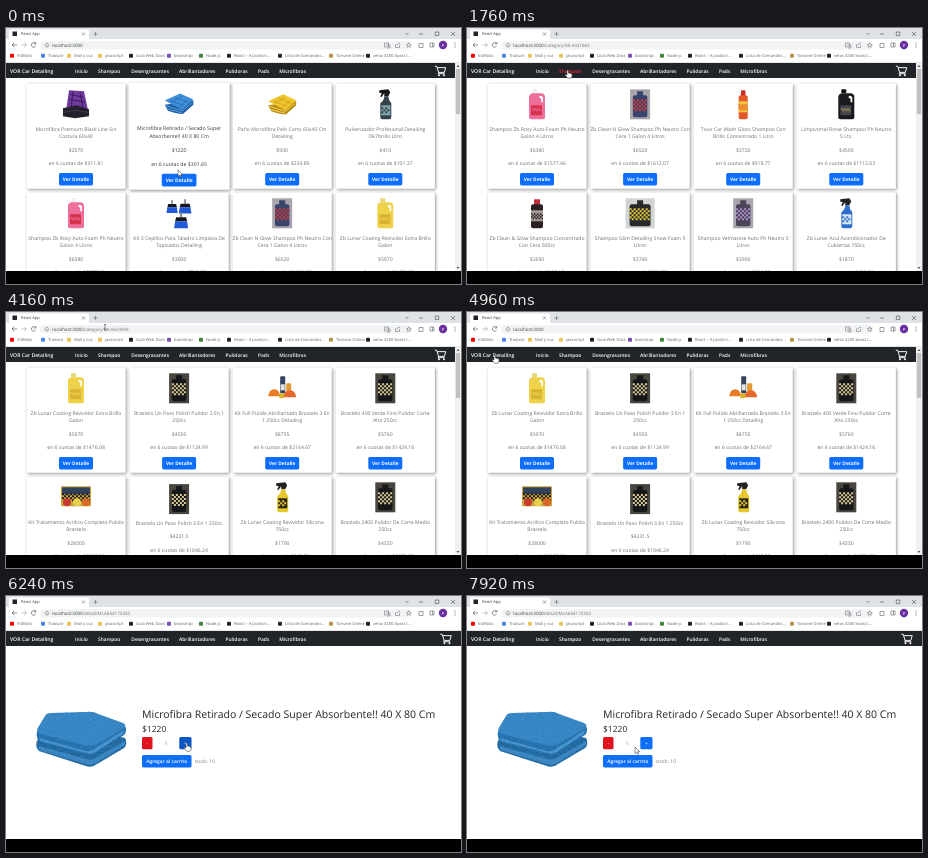
Recreate the animation shown at these times as an HTML page. Size 455 by 256 pixels, loop 8000 ms.

```html
<!DOCTYPE html>
<html lang="es">
<head>
<meta charset="utf-8">
<title>React App</title>
<style>
html, body { margin: 0; width: 100%; height: 100%; overflow: hidden; background: #fff; }
svg { display: block; width: 100vw; height: 100vh; }
text { font-family: "Open Sans", "Noto Sans", sans-serif; text-rendering: geometricPrecision; white-space: pre; }
.card { fill: #fff; filter: drop-shadow(1.1px 1.1px 1.5px rgba(0, 0, 0, .42)); }
#cursor { animation: travel 8s infinite ease-in-out; }
#home-1 { transform-origin: 173px 108px; animation: lift 8s infinite linear; }
@keyframes travel {
  0%, 1% { transform: translate(172px, 142px); }
  8%, 27% { transform: translate(100px, 42px); }
  29%, 40% { transform: translate(153px, 42px); }
  43%, 48% { transform: translate(190px, 42px); }
  52%, 57% { transform: translate(99px, 15px); }
  60%, 63% { transform: translate(27px, 43px); }
  69%, 73% { transform: translate(172px, 142px); }
  75%, 78% { transform: translate(180px, 147px); }
  88%, 89% { transform: translate(119px, 54px); }
  93%, 96% { transform: translate(119px, 30px); }
  99%, 100% { transform: translate(168px, 151px); }
}
@keyframes lift {
  0%, 1% { transform: scale(1.02); fill: #34393e; }
  4%, 67% { transform: scale(1); fill: #6c7176; }
  69%, 100% { transform: scale(1.035); fill: #34393e; }
}
</style>
</head>
<body>
<svg id="stage" viewBox="0 0 455 256" preserveAspectRatio="none"></svg>
<script>
const rect = (x, y, w, h, fill, r = 0, extra = '') =>
  `<rect x="${x}" y="${y}" width="${w}" height="${h}" fill="${fill}" rx="${r}" ${extra}/>`;
const dot = (x, y, r, fill) => `<circle cx="${x}" cy="${y}" r="${r}" fill="${fill}"/>`;
const shape = (d, fill) => `<path d="${d}" fill="${fill}"/>`;
const line = (d, color, w = .7) => `<path d="${d}" fill="none" stroke="${color}" stroke-width="${w}"/>`;
const label = (x, y, size, s, extra = '') => `<text x="${x}" y="${y}" font-size="${size}" ${extra}>${s}</text>`;
const group = (id, body, extra = '') => `<g id="${id}" ${extra}>${body}</g>`;
function checks(x, y, w, h, fill, size = 2) {
  let d = '';
  for (let row = 0; (row + 1) * size <= h; row++)
    for (let col = row % 2; (col + 1) * size <= w; col += 2)
      d += `M${x + col * size} ${y + row * size}h${size}v${size}h${-size}z`;
  return shape(d, fill);
}

// Product pictures, drawn around (0, 0)
const jug = (c, tag, cap, marks = c) =>
  rect(-5, -15, 5, 4, cap, .8) +
  shape('M-8-8Q-7-11-4-11H4Q8-11 8-7V13Q8 15 6 15H-6Q-8 15-8 13Z', c) +
  shape('M3-8.5Q6-8.5 6-6V-2H4.3V-5.5L2-6.8Z', '#fff') + rect(-6, 1, 11, 10, tag, .6) + checks(-5, 4, 9, 4, marks, 1.5);
const spray = (c, trigger, tag, marks = c) =>
  shape('M-6-14L3-15L5-12L3-8H-1V-11L-4-7L-5-8L-3.5-11L-6-11.5Z', trigger) +
  shape('M-1-8H3Q3-4 6-1V13Q6 15 4 15H-3Q-5 15-5 13V-1Q-1-4-1-8Z', c) + rect(-4, 1, 9, 10, tag) + checks(-4, 3, 8, 6, marks);
const bottle = (c, cap, tag, w = 9, marks = c) =>
  rect(-w / 4, -14, w / 2, 6, cap, .6) + rect(-w / 2, -9, w, 24, c, 2) + rect(-w / 2, -3, w, 11, tag) +
  checks(-w / 2, 0, w, 6, marks, 1.5);
const box = (back, body, marks, w = 20) =>
  rect(-w / 2, -15, w, 30, back) + rect(-3, -13, 6, 5, body) + rect(-w * .36, -9, w * .72, 22, body, 2) +
  checks(-w * .36, -5, w * .72, 12, marks);
const towel = (c, dark, lite) =>
  shape('M-14 1L-11 7Q2 11 4 10L14 1V-3Z', dark) + shape('M-14-3L1-10L14-4L3 6Z', c) +
  line('M-13 2L3 7L13-1M-12 5L3 9', lite, .8) + line('M-9-3L5 2M-4-6L9-1M-8-1L3-7M0 3L9-4', dark, .5);
const purpleTowel = shape('M-7-14L8-13L12 6L-10 7Z', '#6f3a9c') +
  line('M-6-10L7-7M-7-5L9-2M-3-13L-5 4M4-12L7 3', '#3c1a61', 1) +
  shape('M-13 4L0 1L13 5V12L-1 14L-13 12Z', '#23202b') + line('M-12 8L0 6L12 8', '#4c4659');
const brush = (x, y, s) => `<g transform="translate(${x} ${y}) scale(${s})">` +
  rect(-1, -9, 2, 5, '#888') + shape('M-5-4H5L6 0H-6Z', '#16181d') + shape('M-6 0H6L7 7H-7Z', '#2159d6') + '</g>';
const brushes = brush(-7, -6, .8) + brush(6, -6, .9) + brush(2, 8, 1);
const pads = rect(-2, -12, 5, 17, '#35435f', 1) + rect(-1.5, -4, 4, 6, '#e3e3de') + rect(4, -5, 5, 11, '#e39a35', 1) +
  shape('M-14 8Q-13 1-8 1Q-3 1-2 8Z', '#ea7c26') + shape('M1 9Q2 2 8 2Q13 2 14 9Z', '#e5672a') + rect(-3, 5, 5, 5, '#d9b52d', 1);
const kit = rect(-15, -11, 30, 20, '#c9a23a', 1) + rect(-14, -10, 28, 7, '#33415c') + checks(-14, -4, 28, 8, '#1d1d1f') +
  dot(-9, 5, 4, '#c8392f') + dot(1, 5, 4, '#e8cf4b') + dot(10, 5, 4, '#d96a2c');

const pink = jug('#ee6f9c', '#d6324e', '#eee'), yellowJug = jug('#edd24a', '#d9b434', '#e8d57a');
const blackJug = jug('#191a1d', '#45464a', '#111', '#a99a5e'), yellowSpray = spray('#e5c72c', '#222', '#29271a');
const darkBox = box('#4a463f', '#17181a', '#d6c793');

// Each product: picture, title lines, price, instalment
const catalog = {
  home: [
    [purpleTowel, 'Microfibra Premium Black Line Sin', 'Costura 60x40', '2070', '311.81'],
    [towel('#3d8fd8', '#205f9f', '#65b0ee'), 'Microfibra Retirado / Secado Super', 'Absorbente!! 40 X 80 Cm', '1220', '301.65'],
    [towel('#f0c52d', '#b98c10', '#fbe17a'), 'Paño Microfibra Pelo Corto 60x40 Cm', 'Detailing', '950', '234.89'],
    [spray('#35424a', '#15181b', '#7fa7ad'), 'Pulverizador Profesional Detailing', 'Ok7brillo Litro', '410', '101.37'],
    [pink, 'Shampoo Zb Rosy Auto Foam Ph Neutro', 'Galon 4 Litros', '6380', '1577.46'],
    [brushes, 'Kit 3 Cepillos Para Taladro Limpieza De', 'Tapizados Detailing', '3000', '741.75'],
    [box('#a9a3ad', '#39456b', '#c43a3f'), 'Zb Clean N Glow Shampoo Ph Neutro Con', 'Cera 1 Galon 4 Litros', '6520', '1612.07'],
    [yellowJug, 'Zb Lunar Coating Revividor Extra Brillo', 'Galon', '5970', '1476.08'],
  ],
  shampoo: [
    [pink, 'Shampoo Zb Rosy Auto Foam Ph Neutro', 'Galon 4 Litros', '6380', '1577.46'],
    [box('#a9a3ad', '#39456b', '#c43a3f'), 'Zb Clean N Glow Shampoo Ph Neutro Con', 'Cera 1 Galon 4 Litros', '6520', '1612.07'],
    [bottle('#e4572a', '#c92f25', '#f3c33b'), 'Tivur Car Wash Gloss Shampoo Con', 'Brillo Concentrado 1 Litro', '3720', '919.77'],
    [blackJug, 'Limpivortal Rinse Shampoo Ph Neutro', '5 Lts.', '4500', '1112.63'],
    [bottle('#2b2023', '#c03038', '#a59c97', 12), 'Zb Clean &amp; Glow Shampoo Concentrado', 'Con Cera 500cc', '2690', '665.10'],
    [box('#d2d3d3', '#27282a', '#e2c93a', 29), 'Shampoo Glim Detailing Snow Foam 5', 'Litros', '3740', '924.72'],
    [box('#a8a5ae', '#4c4458', '#a58bc4'), 'Shampoo Velmarote Auto Ph Neutro 5', 'Litros', '3900', '964.28'],
    [spray('#2d70c9', '#222', '#dbe8f5'), 'Zb Lunar Azul Acondicionador De', 'Cubiertas 750cc', '1870', '462.36'],
  ],
  degreaser: [
    [yellowSpray, 'Zb Amber Cleanser Desengrasante Para', 'Llantas 750cc', '2300', '568.68'],
    [blackJug, 'Limpivortal Fierce Degreaser', 'Desengrasante Exterior 5 Lts.', '3800', '939.55'],
    [bottle('#b9bcc0', '#333', '#8a8d92', 7), 'Lund Farbel Zel Brim Limpiador', 'Multiproposito 1 Litro', '6450', '1594.76'],
    [box('#b9a76a', '#26251f', '#e6cb36'), 'Zb Amber Cleanser Desengrasante', 'Llantas Galon', '6910', '1708.5'],
    [box('#d9a9bb', '#b04770', '#f0e6ea', 25), 'Zb Last Pass Quick Detailer Lubricante', 'Claybar Galon', '8500', '2101.62'],
    [yellowSpray, 'Zb Fly Cleaner Removedor De Insectos', '750cc', '2830', '699.71'],
    [blackJug, 'Limpivortal Apc Desengrasante', 'Multiproposito Interior 5 L.', '3512', '868.34'],
    [jug('#cfe3ee', '#7fb4d6', '#e5e5e5'), 'Glass Cleaner Zb 4 Lt Limpiador De', 'Vidrios', '3510', '867.85'],
  ],
  polish: [
    [yellowJug, 'Zb Lunar Coating Revividor Extra Brillo', 'Galon', '5970', '1476.08'],
    [darkBox, 'Brastelo Un Paso Polish Pulidor 3 En 1', '250cc', '4550', '1124.99'],
    [pads, 'Kit Full Pulido Abrillantado Brastelo 3 En', '1 250cc Detailing', '8755', '2164.67'],
    [darkBox, 'Brastelo 400 Verde Fino Pulidor Corte', 'Alto 250cc', '5760', '1424.16'],
    [kit, 'Kit Tratamiento Acrilico Completo Pulido', 'Brastelo', '28000', '6923.00'],
    [darkBox, 'Brastelo Un Paso Polish 3 En 1 250cc', '', '4231.5', '1046.24'],
    [yellowSpray, 'Zb Lunar Coating Revividor Silicona', '750cc', '1790', '442.58'],
    [darkBox, 'Brastelo 2400 Pulidor De Corte Medio', '250cc', '4330', '1070.59'],
  ],
};

function productCard(page, [art, first, second, price, part], i) {
  const x = 70 + 103.1 * (i % 4), y = i < 4 ? 0 : 109;
  const lone = second ? 0 : 1.8, up = second ? 0 : -6.5;
  const mid = (dy, s) => label(x, y + dy, 5.1, s, 'text-anchor="middle"');
  return group(`${page}-${i}`,
    rect(x - 49.4, y + 55.5, 99, 105.3, '#fff', 1, 'class="card"') +
    `<g transform="translate(${x} ${y + 76.3 + lone})">${art}</g>` +
    mid(102.5 + lone, first) + mid(110.4, second) + mid(123.8 + up, '$' + price) +
    mid(137.2 + up, `en 6 cuotas de $${part}`) + rect(x - 17, y + 145, 34, 12.4, '#0d6efd', 1.6) +
    label(x, y + 152.9, 4.8, 'Ver Detalle', 'text-anchor="middle" fill="#fff" font-weight="700"'),
    'fill="#6c7176"');
}

const cart = x => `<g transform="translate(${x} 42.5) scale(.95)">` +
  line('M-6-4.5H-4L-2 2H4L5.5-3H-3.3M-2 2L-2.6 3.4H4.5', '#fff', 1) + dot(-1.6, 5, 1, '#fff') + dot(3.6, 5, 1, '#fff') + '</g>';
const scrollbar = thumb => rect(449, 35, 6, 208, '#f1f1f1') + rect(449.8, 41, 4.4, thumb, '#c1c1c1') +
  shape('M450.5 39L452 37L453.5 39Z', '#555') + shape('M450.5 239L452 241L453.5 239Z', '#555');
const listPage = name => group(name,
  rect(0, 50, 455, 193, '#fff') + catalog[name].map((p, i) => productCard(name, p, i)).join('') + cart(434.5) +
  scrollbar(name === 'degreaser' ? 88 : 45));

const bigTowel =
  shape('M32 143Q28 150 33 155L80 170Q86 172 91 168L118 152Q122 148 119 142L88 135Z', '#1f659f') +
  shape('M33 150L80 163Q86 165 91 161L119 145L119 149L90 167Q85 170 80 168L33 154Z', '#3c8bcb') +
  shape('M32 133Q29 140 33 145L79 158Q86 160 91 155L118 139Q122 134 118 129Z', '#236fae') +
  shape('M33 138Q32 142 36 143L80 155Q86 156 90 152L118 134L117 138L90 156Q86 159 80 157L34 145Z', '#4c9bda') +
  shape('M39 120Q40 117 46 117L80 116Q87 115 92 118L117 127Q122 130 117 133L91 148Q85 151 78 149L35 138Q29 135 33 130Z', '#398bcd');
const detailPage = group('detail',
  rect(0, 50, 455, 193, '#fff') + `<g filter="url(#fuzz)">${bigTowel}</g>` + cart(440) +
  label(136, 122, 10.5, 'Microfibra Retirado / Secado Super Absorbente!! 40 X 80 Cm') + label(136, 136.2, 8.5, '$1220') +
  rect(136, 141, 10.5, 12.2, '#e0141e', 1.5) + label(141.2, 149, 5, '-', 'fill="#fff" text-anchor="middle"') +
  label(160, 149, 5, '1', 'fill="#777" text-anchor="middle"') +
  rect(173.3, 141, 12.2, 12.2, '#0d6efd', 1.5, 'id="plus"') + label(179.4, 149, 5, '+', 'fill="#fff" text-anchor="middle"') +
  rect(136, 159, 49.5, 12.4, '#0d6efd', 1.6) +
  label(160.8, 166.9, 4.9, 'Agregar al carrito', 'fill="#fff" text-anchor="middle" font-weight="600"') +
  label(188.5, 166.9, 5, 'stock: 10', 'fill="#777c81"'), 'fill="#212529"');

const bookmarks = [
  [6, '#f00', 'VidNido'], [37, '#4a86e8', 'Traducir'], [63, '#e9c55c', 'Mail y cuc'], [94, '#e9c55c', 'javascript'],
  [125, '#222', 'Guía Web Docs'], [163, '#7952b3', 'bootstrap'], [195, '#3c873a', 'Node.js'],
  [223, '#20232a', 'React – A JavaScri...'], [274, '#24292e', 'Lista de Comandos...'],
  [325, '#b8954a', 'Torvane Online'], [362, '#222', 'velox 3200 boost t...'],
];
const urls = {
  home: '', shampoo: '/category/MLA431863', degreaser: '/category/MLA392349',
  polish: '/category/MLA429408', detail: '/detail/MLA664175330',
};
const ink = '#5f6368';
const chrome = rect(0, 0, 455, 11.5, '#dee1e6') + rect(3, 1.5, 80, 11, '#fff', 2) + rect(0, 11, 455, 24, '#fff') +
  rect(0, 34.4, 455, .6, '#d5d7da') +
  rect(6.5, 3.5, 4.5, 4.5, '#20232a') + label(15, 7.4, 4, 'React App', 'fill="#3c4043"') +
  line('M76 4.5L79 7.5M79 4.5L76 7.5M87.5 6H91.5M89.5 4V8', ink, .6) +
  line('M399.5 5L401 6.5L402.5 5M413 6H417M429.3 4H432.8V7.5H429.3ZM445 4L449 8M449 4L445 8', '#333', .5) +
  line('M11 17H6M8.3 14.7L6 17L8.3 19.3', ink) + line('M15.5 17H20.5M18.2 14.7L20.5 17L18.2 19.3', '#aaa') +
  line('M29.5 15.5A2.3 2.3 0 1 0 29.7 18M29.8 14V16H27.8', ink) +
  rect(34, 13, 372, 8.6, '#f1f3f4', 4.3) + line('M41 15.3A1.9 1.9 0 1 1 40.9 15.3M41 16.7V18.3', ink, .5) +
  line('M378.5 15H382.5V19H378.5ZM380 17H384V20H381M389.5 16V19.5H393.5V17M391 17.5Q391.5 15 394 15', ink, .5) +
  line('M402.7 14.8L403.4 16.4L405.1 16.5L403.8 17.6L404.2 19.3L402.7 18.4L401.2 19.3L401.6 17.6L400.3 16.5L402 16.4Z', ink, .5) +
  line('M413 15.5H417V19.5H413ZM424 15H428V19H424ZM426.5 15V19', ink, .6) +
  dot(437, 17, 4.2, '#6a2fa0') + label(437, 18.6, 4.2, 'P', 'fill="#fff" text-anchor="middle"') +
  dot(449, 15, .6, ink) + dot(449, 17, .6, ink) + dot(449, 19, .6, ink) +
  bookmarks.map(([x, c, s]) => rect(x - 2, 25.7, 4, 4, c, 1) + label(x + 5, 29.2, 4.1, s, `fill="${ink}"`)).join('') +
  Object.entries(urls).map(([id, path]) =>
    group('url-' + id, label(46.3, 18.7, 4.5, `localhost:3000<tspan fill="#777">${path}</tspan>`, 'fill="#3c4043"'))).join('');

const links = [[69, 'Inicio'], [92, 'Shampoo'], [125.3, 'Desengrasantes'], [173, 'Abrillantadores'],
  [219.5, 'Pulidoras'], [252, 'Pads'], [273.3, 'Microfibras']];
const navbar = rect(0, 35, 455, 15, '#212529') + label(4, 44.5, 5.1, 'VOR Car Detailing', 'fill="#fff" font-weight="600"') +
  links.map(([x, s]) => label(x, 44.5, 4.9, s, `id="${s}" fill="#fff" font-weight="600"`)).join('');

const cursor = group('cursor',
  group('arrow', '<path d="M0 0V6.5L1.6 5.1L2.6 7.3L3.6 6.8L2.6 4.7H4.7Z" fill="#fff" stroke="#222" stroke-width=".5"/>') +
  group('hand', '<path d="M0 .4Q.8-.5 1.5.4V3L5 3.8V6.4L4 8.2H.6L-2 5L-1.4 4.2L0 5Z" fill="#fff" stroke="#222" stroke-width=".5"/>') +
  group('beam', line('M-1-2.5H1M0-2.5V3M-1 3H1', '#333', .6)));

document.getElementById('stage').innerHTML =
  `<filter id="fuzz"><feTurbulence type="fractalNoise" baseFrequency=".55" numOctaves="2" seed="4"/>
   <feColorMatrix values="0 0 0 0 .04  0 0 0 0 .2  0 0 0 0 .42  0 1.8 0 0 -.62"/>
   <feComposite in2="SourceGraphic" operator="in" result="nap"/>
   <feMerge><feMergeNode in="SourceGraphic"/><feMergeNode in="nap"/></feMerge></filter>` +
  chrome + navbar + Object.keys(catalog).map(listPage).join('') + detailPage +
  rect(0, 243, 455, 13, '#000') + cursor;

// Switch a property on during the given ranges (percent of the loop)
const sheet = document.createElement('style');
function toggle(id, ranges, prop = 'opacity', on = 1, off = 0) {
  const stops = ranges[0][0] ? [[0, off]] : [];
  for (const [from, to] of ranges) stops.push([from, on], [to, to < 100 ? off : on]);
  sheet.textContent += `@keyframes on-${id} {${stops.map(([t, v]) => `${t}% {${prop}: ${v}}`).join(' ')}}
    #${id} { animation: on-${id} 8s infinite step-end; }\n`;
}
const visits = { home: [[0, 12], [62, 73]], shampoo: [[12, 33]], degreaser: [[33, 46]], polish: [[46, 62]], detail: [[73, 100]] };
for (const [id, ranges] of Object.entries(visits)) {
  toggle('url-' + id, ranges);
  toggle(id, ranges.map(([a, b]) => [a && a + 1, Math.min(b + 1, 100)]));
}
const red = ['fill', '#e8283c', '#fff'];
toggle('Shampoo', [[6, 28]], ...red);
toggle('Desengrasantes', [[28, 41]], ...red);
toggle('Abrillantadores', [[42, 49]], ...red);
toggle('plus', [[74, 79]], 'fill', '#0b55c4', '#0d6efd');
toggle('arrow', [[0, 6], [49, 51], [58, 59], [64, 68], [80, 100]]);
toggle('hand', [[6, 49], [59, 64], [73, 80]]);
toggle('beam', [[51, 58], [68, 73]]);
document.head.append(sheet);
</script>
</body>
</html>
```
